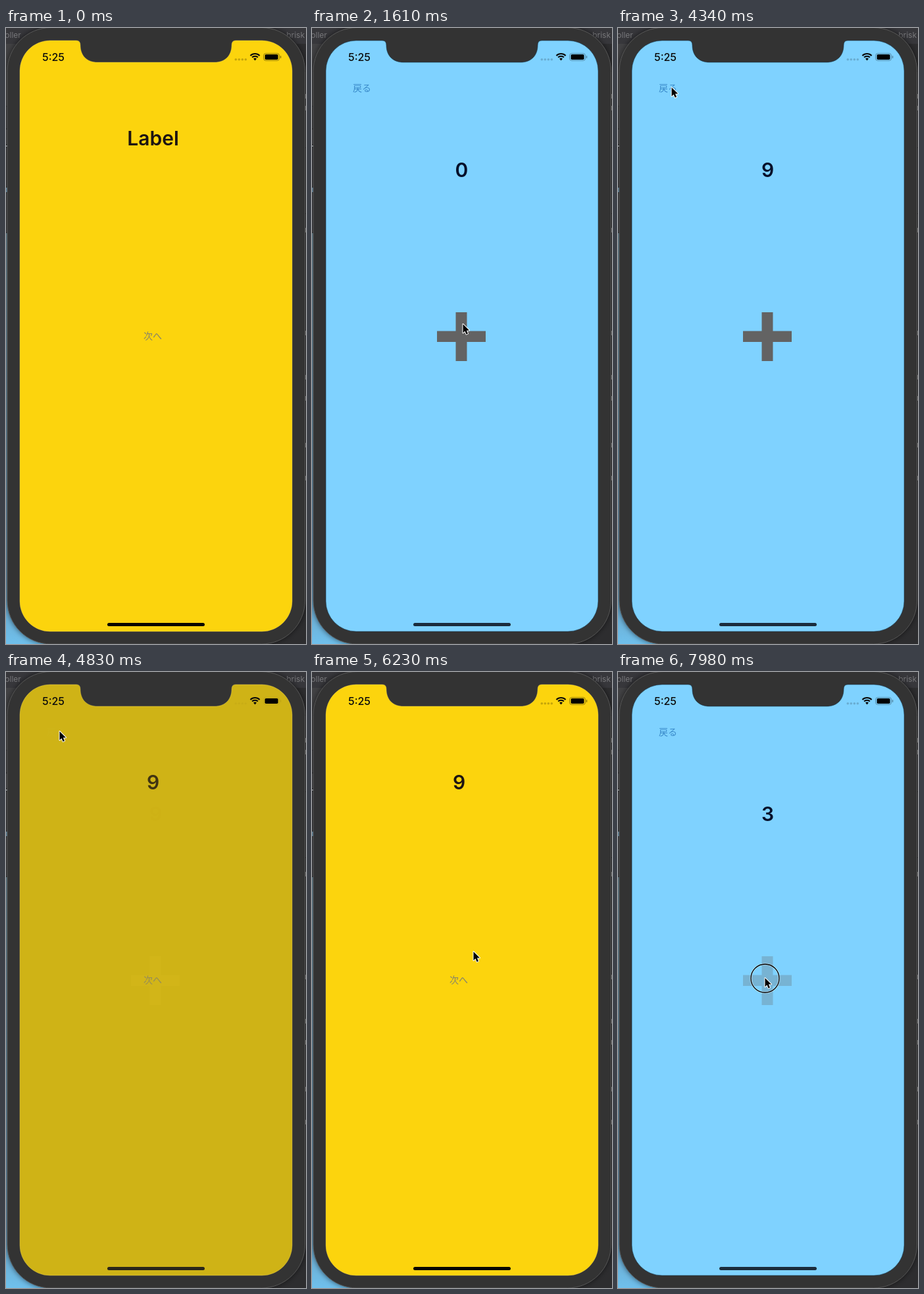
An HTML page with a canvas for the animation above (8000 ms loop, 456 px wide and 934 px high).

```html
<!DOCTYPE html>
<html lang="ja">
<head>
<meta charset="utf-8">
<title>Counter demo</title>
<style>
html, body { margin: 0; width: 100%; height: 100%; overflow: hidden; background: #2d2d2f; }
canvas { display: block; }
</style>
</head>
<body>
<canvas id="stage" width="456" height="934"></canvas>
<script>
const ctx = document.getElementById('stage').getContext('2d');
const W = 456, H = 934, LOOP = 8000;
const SANS = 'Inter, sans-serif', CJK = '"Noto Sans CJK JP", "Noto Sans CJK", sans-serif';
const YELLOW = '#fcd40d', BLUE = '#7fd2ff', BODY = '#333333';

const HOLD = 110, FADE = 400;
const series = (start, gap, n) => Array.from({ length: n }, (_, i) => start + gap * i);
// Release times of each button.
const nextTaps = [1010, 6640];
const backTaps = [4530];
const plusTaps = [...series(1760, 225, 9), ...series(7400, 220, 4)];
const allTaps = [...nextTaps, ...backTaps, ...plusTaps];
// Dissolves: start time, target page, falloff of the outgoing page.
const dissolves = [[1015, 'blue', 1.5], [4546, 'yellow', 1.9], [6650, 'blue', 1.5]];
// Pointer stops: time, x, y.
const route = [
  [200, 474, 590], [820, 216, 467], [1180, 216, 467], [1520, 229, 448],
  [2400, 229, 449], [3220, 229, 451], [3700, 229, 451], [4350, 81, 89], [4950, 81, 89],
  [6230, 245, 423], [6500, 221, 464], [7100, 221, 464], [7400, 223, 463], [8000, 223, 463]
];

const clamp = x => Math.max(0, Math.min(1, x));
const smooth = x => (x = clamp(x), x * x * (3 - 2 * x));

function pointerAt(t) {
  const i = Math.max(1, route.findIndex(s => s[0] >= t));
  const [t0, x0, y0] = route[i - 1], [t1, x1, y1] = route[i];
  const k = smooth((t - t0) / (t1 - t0));
  return [x0 + (x1 - x0) * k, y0 + (y1 - y0) * k];
}

// Opacity of a button that dims on press and recovers after release.
function buttonAlpha(t, taps, low, recover) {
  return Math.min(1, ...taps.map(r => {
    const k = t < r ? clamp((r - HOLD + 30 - t) / 30) : clamp((t - r) / recover);
    return low + (1 - low) * k;
  }));
}

function rect(x, y, w, h, color) {
  ctx.fillStyle = color;
  ctx.fillRect(x, y, w, h);
}

function pill(x, y, w, h, r, color) {
  ctx.beginPath();
  ctx.roundRect(x, y, w, h, r);
  ctx.fillStyle = color;
  ctx.fill();
}

function text(str, x, y, font, color, align = 'center') {
  ctx.font = font;
  ctx.textAlign = align;
  ctx.fillStyle = color;
  ctx.fillText(str, x, y);
}

function withAlpha(a, draw) {
  ctx.save();
  ctx.globalAlpha *= a;
  draw();
  ctx.restore();
}

function drawDesktop() {
  rect(0, 0, W, H, '#2d2d2f');
  rect(0, 0, W, 24, '#37373b');
  rect(0, 24, 40, 94, '#424244');
  rect(0, 119, 4, 33, '#3d3d3f');
  rect(0, 154, 4, 22, '#48484a');
  rect(0, 178, 3, 2, '#aeb4b8');
  rect(0, 182, 4, 59, '#3b3b3d');
  rect(0, 242, 3, 7, '#7ba6c2');
  rect(0, 250, 4, 60, '#434345');
  const sky = ctx.createLinearGradient(0, 310, 0, H);
  sky.addColorStop(0, '#70909f');
  sky.addColorStop(0.85, '#6a9bbb');
  sky.addColorStop(1, '#6fc0ec');
  rect(0, 311, 60, H - 311, sky);
  text('roller', -6, 15, '12px ' + SANS, '#77777a', 'left');
  text('brisk', 454, 15, '12px ' + SANS, '#77777a', 'right');
  rect(452, 181, 4, 1, '#151517');
  rect(452, 281, 4, 1, '#151517');
  for (const y of [100, 118, 303, 459, 526, 558, 629, 679]) rect(454, y, 2, 7, '#8a8a8c');
}

function drawBody() {
  ctx.save();
  ctx.shadowColor = 'rgba(0,0,0,.6)';
  ctx.shadowBlur = 8;
  pill(2, -1, 452.5, 935, 66, BODY);
  ctx.restore();
  ctx.strokeStyle = '#565656';
  ctx.lineWidth = 1;
  ctx.beginPath();
  ctx.roundRect(2, -0.5, 452.5, 934.5, 66);
  ctx.stroke();
}

function screenPath() {
  const l = 21, r = 435, t = 19, b = 915, c = 46;
  ctx.beginPath();
  ctx.moveTo(l + c, t);
  ctx.lineTo(107, t);
  ctx.quadraticCurveTo(113, t, 113, 26);
  ctx.bezierCurveTo(113, 42, 123, 52, 139, 52);
  ctx.lineTo(317, 52);
  ctx.bezierCurveTo(333, 52, 343, 42, 343, 26);
  ctx.quadraticCurveTo(343, t, 349, t);
  ctx.arcTo(r, t, r, b, c);
  ctx.arcTo(r, b, l, b, c);
  ctx.arcTo(l, b, l, t, c);
  ctx.arcTo(l, t, r, t, c);
  ctx.closePath();
}

function drawYellow(t) {
  rect(0, 0, W, H, YELLOW);
  text(t < 4000 ? 'Label' : '9', 223.5, 178, '600 30px ' + SANS, '#1c1412');
  withAlpha(buttonAlpha(t, nextTaps, 0, 400), () =>
    text('次へ', 223, 472, '14px ' + CJK, '#85826c'));
}

function drawBlue(t) {
  rect(0, 0, W, H, BLUE);
  const from = t < 5500 ? 0 : 5500;
  const count = plusTaps.filter(r => r >= from && r <= t).length;
  text(count, 227.5, 226, '600 30px ' + SANS, '#06102a');
  withAlpha(buttonAlpha(t, backTaps, 0.2, 400), () =>
    text('戻る', 76, 96, '300 14px ' + CJK, 'rgba(30,110,180,.7)'));
  withAlpha(buttonAlpha(t, plusTaps, 0.28, 220), () => {
    ctx.beginPath();
    ctx.rect(218.5, 431, 17, 74);
    ctx.rect(190, 459.5, 74, 16.5);
    ctx.fillStyle = '#636363';
    ctx.fill();
  });
}

const pages = { yellow: drawYellow, blue: drawBlue };

function drawStatus(faint) {
  text('5:25', 55, 49.5, '500 16px ' + SANS, '#0c0c0c', 'left');
  withAlpha(faint, () => {
    for (let i = 0; i < 4; i++) pill(347.5 + i * 5, 46, 3.6, 3.6, 1.8, 'rgba(0,0,0,.22)');
    ctx.strokeStyle = 'rgba(0,0,0,.4)';
    ctx.lineWidth = 1;
    ctx.beginPath();
    ctx.roundRect(391.5, 38.5, 24, 11, 3.5);
    ctx.stroke();
    pill(416.8, 42, 1.4, 4, 0.7, 'rgba(0,0,0,.45)');
  });
  pill(393.5, 40, 20, 8, 1.8, '#000');
  ctx.strokeStyle = '#0a0a0a';
  ctx.lineWidth = 2.1;
  for (const r of [6.2, 10]) {
    ctx.beginPath();
    ctx.arc(378.5, 49, r, -Math.PI * 0.75, -Math.PI * 0.25);
    ctx.stroke();
  }
  ctx.beginPath();
  ctx.moveTo(378.5, 49.5);
  ctx.arc(378.5, 49, 3.4, -Math.PI * 0.75, -Math.PI * 0.25);
  ctx.fillStyle = '#0a0a0a';
  ctx.fill();
}

function drawScreen(t) {
  const current = dissolves.filter(d => t >= d[0]).pop();
  const page = current ? current[1] : 'yellow';
  const p = current ? smooth((t - current[0]) / FADE) : 1;

  ctx.save();
  screenPath();
  ctx.clip();
  if (p < 1) {
    rect(0, 0, W, H, '#000');
    const old = page === 'blue' ? 'yellow' : 'blue';
    withAlpha(Math.pow(1 - p, current[2] - 1), () => pages[old](t));
  }
  withAlpha(p, () => pages[page](t));
  drawStatus(p < 1 ? 0.15 : page === 'blue' ? 0.8 : 1);
  const bar = page === 'blue' ? (p < 1 ? '#2a2a24' : '#1b2c3c') : (p < 1 ? '#2a2619' : '#080600');
  pill(154, 902, 148, 5, 2.5, bar);
  ctx.restore();

  screenPath();
  ctx.lineWidth = 1;
  ctx.strokeStyle = page === 'blue' ? 'rgba(20,50,70,.6)' : 'rgba(225,200,90,.4)';
  ctx.stroke();
}

function drawPointer(t) {
  if (t < route[0][0]) return;
  const [x, y] = pointerAt(t);
  ctx.save();
  ctx.translate(x, y);
  if (allTaps.some(r => t >= r - HOLD && t < r)) {
    ctx.beginPath();
    ctx.arc(0.5, 1.5, 21.5, 0, Math.PI * 2);
    ctx.strokeStyle = 'rgba(255,255,255,.45)';
    ctx.lineWidth = 3;
    ctx.stroke();
    ctx.strokeStyle = '#000';
    ctx.lineWidth = 1.3;
    ctx.stroke();
  }
  ctx.beginPath();
  ctx.moveTo(0.5, 1);
  for (const [px, py] of [[0.5, 14.3], [3.5, 11.5], [5.6, 16.4], [8, 15.4], [5.9, 10.6], [10, 10.4]]) {
    ctx.lineTo(px, py);
  }
  ctx.closePath();
  ctx.lineJoin = 'round';
  ctx.strokeStyle = '#fff';
  ctx.lineWidth = 2;
  ctx.stroke();
  ctx.fillStyle = '#000';
  ctx.fill();
  ctx.restore();
}

const start = performance.now();
function frame() {
  const t = (performance.now() - start) % LOOP;
  drawDesktop();
  drawBody();
  drawScreen(t);
  drawPointer(t);
  requestAnimationFrame(frame);
}
frame();
</script>
</body>
</html>
```
